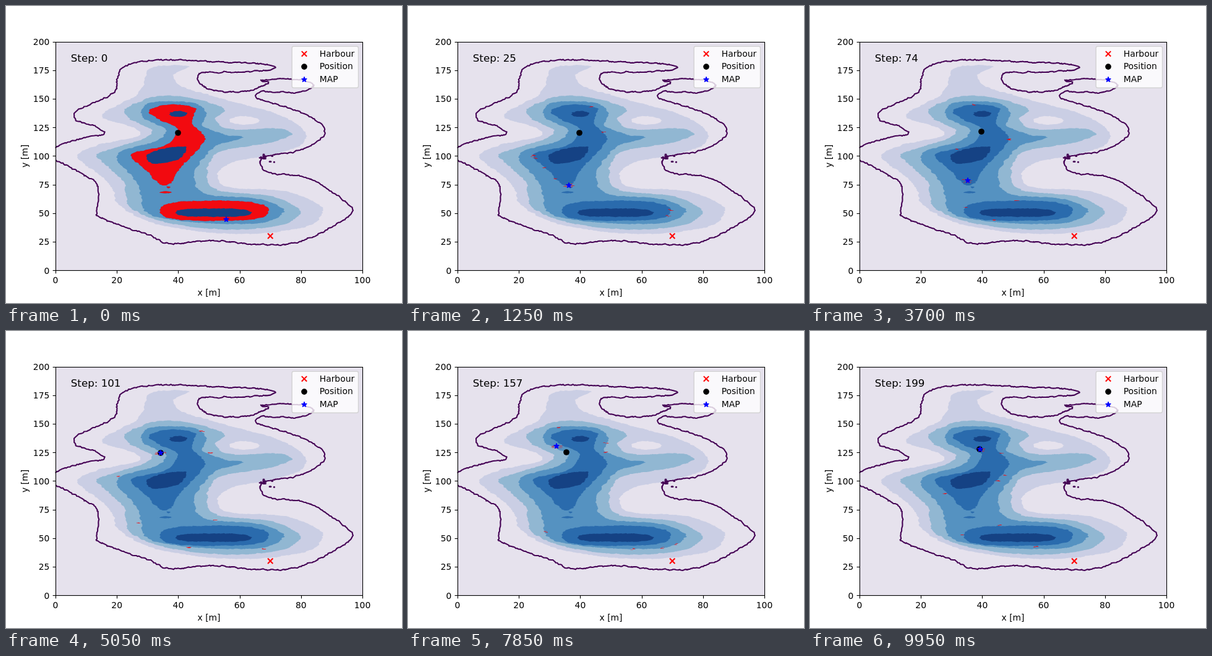
Animation of 640 by 480 pixels, one loop 10000 ms. Source, as an HTML page with a canvas:

```html
<!DOCTYPE html>
<html>
<head>
<meta charset="utf-8">
<style>
  html, body { margin: 0; width: 100%; height: 100%; overflow: hidden; background: #fff; }
  canvas { display: block; }
</style>
</head>
<body>
<canvas id="stage" width="640" height="480"></canvas>
<script>
const ctx = document.getElementById('stage').getContext('2d');
const FONT = '"DejaVu Sans", sans-serif';
const RED = '#f20a10', SEA = '#e6e2ed', DEEP = '#154284', COAST = '#440154';
const px = x => 80 + 4.96 * x;
const py = y => 427.2 - 1.848 * y;
const mix = (a, b, u) => a + (b - a) * u;

function seeded(seed) {
  let s = seed * 7919 + 17;
  return () => {
    s = (s + 0x6D2B79F5) | 0;
    let v = Math.imul(s ^ (s >>> 15), 1 | s);
    v = (v + Math.imul(v ^ (v >>> 7), 61 | v)) ^ v;
    return ((v ^ (v >>> 14)) >>> 0) / 4294967296;
  };
}

// Smooth curve through a few points x, y, x, y, ... with correlated raggedness.
function rough(flat, closed, ampX, ampY) {
  const rand = seeded(flat.length), n = flat.length / 2, path = [];
  const at = i => {
    const k = closed ? (i + n) % n : Math.max(0, Math.min(n - 1, i));
    return [flat[2 * k], flat[2 * k + 1]];
  };
  let dx = 0, dy = 0;
  for (let i = 0; i < (closed ? n : n - 1); i++) {
    const a = at(i - 1), b = at(i), c = at(i + 1), d = at(i + 2);
    const steps = Math.max(1, Math.ceil(Math.hypot(c[0] - b[0], c[1] - b[1]) / 2));
    for (let k = 0; k < steps; k++) {
      const u = k / steps;
      const p = j => b[j] + u / 2 * (c[j] - a[j] + u * (2 * a[j] - 5 * b[j] + 4 * c[j] - d[j]
        + u * (3 * (b[j] - c[j]) + d[j] - a[j])));
      dx = dx * 0.55 + (rand() - 0.5) * 2 * ampX;
      dy = dy * 0.55 + (rand() - 0.5) * 2 * ampY;
      path.push([p(0) + dx, p(1) + dy]);
    }
  }
  return path;
}

const area = flat => rough(flat, true, 1.7, 0.5);

// Squarish oval; power 1 gives an ellipse, less makes it blunter.
function oval(cx, cy, rx, ry, power = 1) {
  const bend = v => Math.sign(v) * Math.abs(v) ** power;
  const flat = [];
  for (let a = 0; a < 6.28; a += Math.PI / 8) {
    flat.push(cx + rx * bend(Math.cos(a)), cy + ry * bend(Math.sin(a)));
  }
  return area(flat);
}

const level1 = area([
  240,98, 294,97, 271,113, 284,130, 325,143, 360,153, 395,162, 425,170, 452,181, 475,195, 486,210,
  468,229, 415,243, 365,253, 342,272, 360,293, 450,299, 500,318, 512,333, 488,356, 400,368, 310,364,
  230,348, 182,320, 174,298, 150,272, 122,252, 118,238, 155,223, 215,210, 205,196, 155,177, 212,143, 228,110]);
const level2 = area([
  240,147, 295,148, 352,166, 338,183, 362,199, 440,198, 460,209, 420,222, 345,236, 325,266, 341,297,
  430,308, 475,332, 440,355, 350,361, 260,350, 203,328, 196,308, 190,284, 155,251, 150,238, 215,217,
  236,201, 200,182, 192,167]);
const level3 = area([
  241,155, 300,156, 323,172, 318,193, 355,208, 383,212, 340,226, 316,250, 302,278, 325,304, 410,312,
  449,331, 415,350, 320,351, 245,341, 222,327, 218,305, 210,283, 180,249, 190,233, 240,219, 258,200,
  225,183, 219,166]);
const level4 = [
  area([232,168, 265,159, 305,166, 301,188, 320,211, 312,230, 284,258, 264,288, 246,286, 228,267,
    204,246, 210,236, 255,226, 277,206, 273,195, 243,181]),
  oval(336, 331, 88, 16.5, 0.75),
  oval(258, 301, 10, 1.5),
  oval(262, 293, 3, 1.5)];
const level5 = [
  oval(278, 174.5, 14, 4.5),
  area([226,243, 252,231, 290,227, 291,235, 274,249, 240,255]),
  oval(335, 334, 62, 7, 0.8)];
const coast = rough([
  80,228, 120,214, 158,207, 148,196, 112,183, 118,168, 173,141, 180,118, 193,97, 250,87, 330,90,
  428,95, 421,104, 350,107, 311,110, 317,128, 345,138, 391,137, 424,124, 412,120, 468,118, 497,128,
  470,140, 416,138, 406,149, 455,164, 503,186, 514,208, 480,232, 430,241, 411,251, 427,270, 488,278,
  550,318, 558,336, 510,366, 460,384, 400,385, 330,379, 264,384, 228,369, 155,343, 147,330, 148,290,
  120,270, 80,249], false, 1.1, 0.9);

// Boat [x, y] and best estimate [x, y] at a few steps.
const scenes = [
  { step: 0, boat: [278, 205], best: [356, 345] },
  { step: 25, boat: [277, 205], best: [260, 290] },
  { step: 74, boat: [277, 203], best: [255, 282] },
  { step: 101, boat: [250, 197], best: [250, 197] },
  { step: 139, boat: [265, 200], best: [240, 334] },
  { step: 157, boat: [256, 196], best: [240, 186] },
  { step: 199, boat: [274, 191], best: [275, 191] }];

function trace(c, path) {
  c.beginPath();
  path.forEach(p => c.lineTo(...p));
}

function fill(c, path, color) {
  trace(c, path);
  c.fillStyle = color;
  c.fill();
}

function line(c, x1, y1, x2, y2) {
  c.beginPath();
  c.moveTo(x1, y1);
  c.lineTo(x2, y2);
  c.stroke();
}

function text(c, str, x, y, align, size = 13.89) {
  c.font = size + 'px ' + FONT;
  c.textAlign = align;
  c.fillStyle = '#000';
  c.fillText(str, x, y);
}

function cross(c, x, y) {
  c.strokeStyle = '#f00';
  c.lineWidth = 2.08;
  line(c, x - 4.17, y - 4.17, x + 4.17, y + 4.17);
  line(c, x - 4.17, y + 4.17, x + 4.17, y - 4.17);
}

function dot(c, x, y) {
  c.fillStyle = '#000';
  c.beginPath();
  c.arc(x, y, 4.86, 0, 7);
  c.fill();
}

function star(c, x, y) {
  c.beginPath();
  for (let i = 0; i < 10; i++) {
    const r = i % 2 ? 1.59 : 4.17, a = i * Math.PI / 5;
    c.lineTo(x + r * Math.sin(a), y - r * Math.cos(a));
  }
  c.closePath();
  c.fillStyle = c.strokeStyle = '#00f';
  c.lineWidth = 1.39;
  c.lineJoin = 'round';
  c.fill();
  c.stroke();
}

function layer(paint) {
  const canvas = document.createElement('canvas');
  canvas.width = 640;
  canvas.height = 480;
  paint(canvas.getContext('2d'));
  return canvas;
}

const chart = layer(c => {
  c.fillStyle = '#fff';
  c.fillRect(0, 0, 640, 480);
  c.fillStyle = SEA;
  c.fillRect(80, 58, 496, 369);
  fill(c, level1, '#cacee4');
  fill(c, oval(385, 185, 25, 6.5), SEA);
  fill(c, level2, '#91b7d2');
  fill(c, level3, '#5592c1');
  level4.forEach(p => fill(c, p, '#2a6bad'));
  level5.forEach(p => fill(c, p, DEEP));
  c.strokeStyle = COAST;
  c.lineWidth = 2.08;
  c.lineJoin = 'round';
  trace(c, coast);
  c.stroke();
  // Islets scattered in the eastern bay.
  const rand = seeded(5);
  c.fillStyle = COAST;
  for (let i = 0; i < 8; i++) {
    c.beginPath();
    c.ellipse(409 + 26 * rand(), 240 + 18 * rand(), 1.5 + 2 * rand(), 1.5, 0, 0, 7);
    c.fill();
  }
});

const overlay = layer(c => {
  c.strokeStyle = '#000';
  c.lineWidth = 1.11;
  c.strokeRect(80.5, 58.5, 496, 369);
  for (let v = 0; v <= 100; v += 20) {
    const x = Math.round(px(v)) + 0.5;
    line(c, x, 427.5, x, 432.4);
    text(c, v, px(v), 447.7, 'center');
  }
  for (let v = 0; v <= 200; v += 25) {
    const y = Math.round(py(v)) + 0.5;
    line(c, 80.5, y, 75.6, y);
    text(c, v, 70.3, py(v) + 5.3, 'right');
  }
  text(c, 'x [m]', 328, 467.5, 'center');
  c.save();
  c.translate(35, 242.4);
  c.rotate(-Math.PI / 2);
  text(c, 'y [m]', 0, 0, 'center');
  c.restore();

  c.beginPath();
  c.roundRect(462.2, 65.3, 107.3, 67, 2.8);
  c.fillStyle = 'rgba(255,255,255,0.8)';
  c.strokeStyle = 'rgba(204,204,204,0.8)';
  c.lineWidth = 1.39;
  c.fill();
  c.stroke();
  [['Harbour', cross], ['Position', dot], ['MAP', star]].forEach(([name, mark], i) => {
    mark(c, 482, 77.3 + 20.8 * i);
    text(c, name, 506.7, 81.6 + 20.8 * i, 'left');
  });
});

// A few thin translucent red dashes around one place.
function patch(rand, x, y, rx, ry) {
  ctx.fillStyle = RED;
  for (let i = 0; i < 3 + rx * ry / 2; i++) {
    const w = 1 + rand() * 4;
    ctx.globalAlpha = 0.25 + 0.5 * rand();
    ctx.fillRect(x + (rand() * 2 - 1) * rx - w / 2, Math.round(y + (rand() * 2 - 1) * ry), w, 1);
  }
  ctx.globalAlpha = 1;
}

const innerEdge = level4[0].concat(level4[1]);

// Random place on the depth line that runs through the boat.
function onDepthLine(rand, boatX) {
  const [x, y] = level3[Math.floor(rand() * level3.length)];
  const gap = p => Math.hypot(p[0] - x, p[1] - y);
  const inner = innerEdge.reduce((a, b) => gap(b) < gap(a) ? b : a);
  const u = (boatX - 255) / 21;
  return [mix(x, inner[0], u), mix(y, inner[1], u)];
}

function draw(step) {
  const later = Math.max(1, scenes.findIndex(s => s.step >= step));
  const a = scenes[later - 1], b = scenes[later];
  const u = (step - a.step) / (b.step - a.step);
  const boat = [0, 1].map(i => mix(a.boat[i], b.boat[i], u));
  const best = step && (later === 1 || u >= 0.5) ? b.best : a.best;

  ctx.drawImage(chart, 0, 0);
  if (step === 0) {
    level4.forEach(p => fill(ctx, p, RED));
    level5.forEach(p => fill(ctx, p, DEEP));
  } else {
    // The cloud thins out quickly, then gathers around the best estimate.
    const rand = seeded(step);
    for (let i = 0; i < 6 + 60 / step; i++) patch(rand, ...onDepthLine(rand, boat[0]), 3, 1);
    patch(rand, ...best, 8, 3);
  }

  cross(ctx, px(70), py(30));
  dot(ctx, ...boat);
  star(ctx, ...best);
  ctx.drawImage(overlay, 0, 0);
  text(ctx, 'Step: ' + step, 104.8, 90, 'left', 16.67);
}

const start = performance.now();
function tick() {
  draw(Math.floor((performance.now() - start) / 50) % 200);
  requestAnimationFrame(tick);
}
tick();
</script>
</body>
</html>
```
